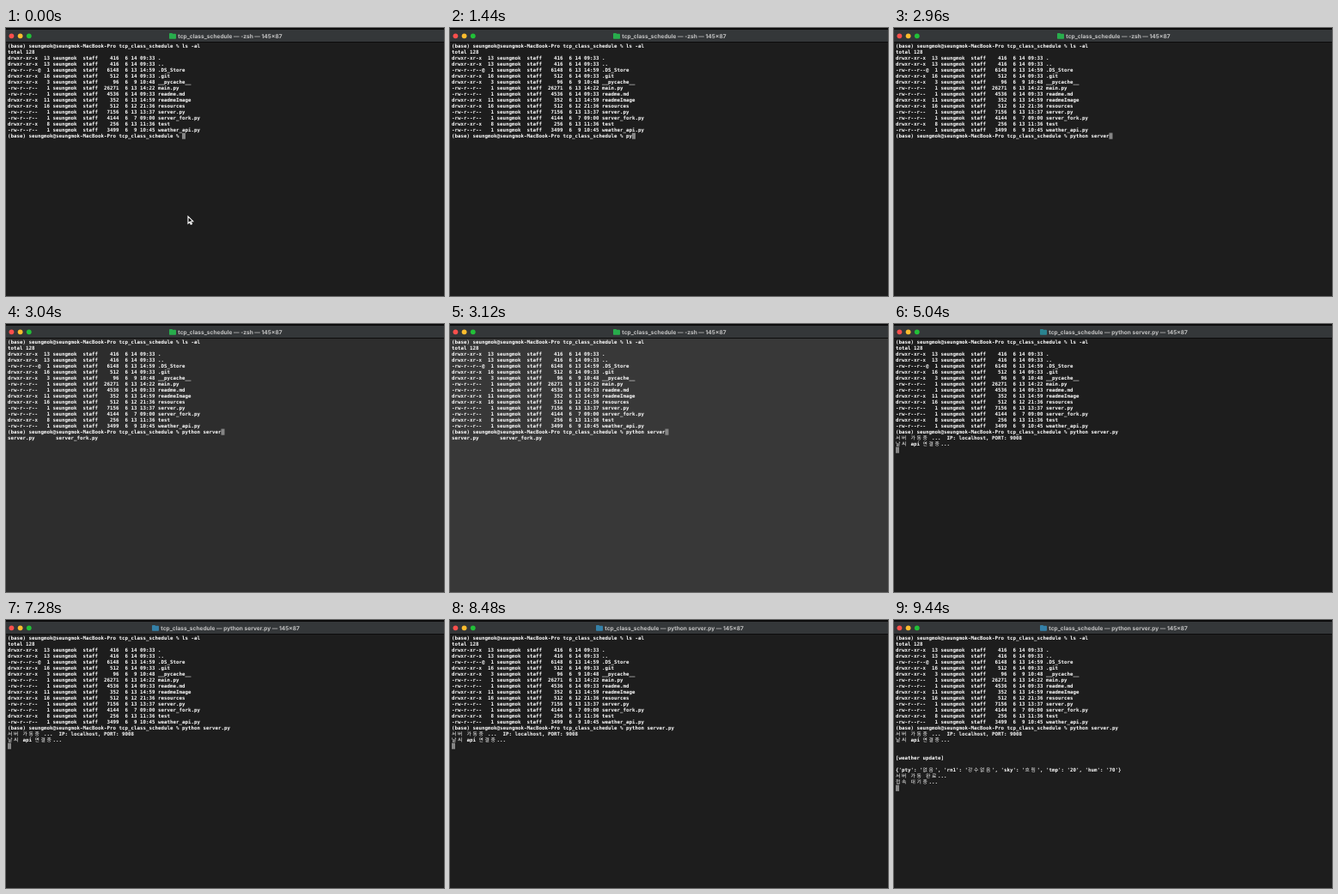
An HTML page with a canvas that plays this animation: 510x313 px, repeating every 9.52 s.

```html
<!DOCTYPE html>
<html lang="en">
<head>
<meta charset="utf-8">
<title>Terminal</title>
<style>
  html, body { margin: 0; width: 510px; height: 313px; overflow: hidden; background: #1d1d1d; }
  canvas { display: block; }
</style>
</head>
<body>
<canvas id="stage" width="510" height="313"></canvas>
<script>
const ctx = document.getElementById('stage').getContext('2d');
const LOOP = 9520, CELL = 3.5, ROW = 7.02, LEFT = 2, TOP = 17.2;
const MONO = 'bold 5.8px "DejaVu Sans Mono", monospace';
const CJK = '500 5.8px "Noto Sans CJK KR", "Noto Sans CJK", sans-serif';
const TITLE = '700 6.6px Inter, sans-serif';

const user = 'seungmok';
const prompt = `(base) ${user}@${user}-MacBook-Pro tcp_class_schedule % `;
const command = 'python server.py';

// mode, links, size, date, name
const files = `d 13 416 6 14 09:33 .
d 13 416 6 14 09:33 ..
@ 1 6148 6 13 14:59 .DS_Store
d 16 512 6 14 09:33 .git
d 3 96 6 9 10:48 __pycache__
- 1 26271 6 13 14:22 main.py
- 1 4536 6 14 09:33 readme.md
d 11 352 6 13 14:59 readmeImage
d 16 512 6 12 21:36 resources
- 1 7156 6 13 13:37 server.py
- 1 4144 6 7 09:00 server_fork.py
d 8 256 6 13 11:36 test
- 1 3499 6 9 10:45 weather_api.py`.split('\n').map(listing);

const started = ['서버 가동중 ...  IP: localhost, PORT: 9008', '날씨 api 연결중...'];
const report = ['', '', '[weather update]', '',
  "{'pty': '없음', 'rn1': '강수없음', 'sky': '흐림', 'tmp': '20', 'hum': '70'}",
  '서버 가동 완료...', '접속 대기중...'];

// One time per typed character of the command
const keys = [1360, 1440, 1520, 1680, 1760, 1840, 2000, 2080, 2160, 2320, 2400,
  2640, 2880, 3440, 3600, 3680];
const TAB = 3040, ENTER = 4080, START = 4320, REPORT = 8720;

function listing(line) {
  const [kind, links, size, month, day, time, name] = line.split(' ');
  const mode = kind === 'd' ? 'drwxr-xr-x ' : '-rw-r--r--' + (kind === '@' ? '@' : ' ');
  return `${mode} ${links.padStart(2)} ${user}  staff  ${size.padStart(5)} ` +
    `${month.padStart(2)} ${day.padStart(2)} ${time} ${name}`;
}

function write(text, row) {
  const y = TOP + row * ROW + 5.4;
  let x = LEFT;
  for (const ch of text) {
    const wide = ch >= '가' && ch <= '힣';
    ctx.font = wide ? CJK : MONO;
    if (ch !== ' ') ctx.fillText(ch, x, y);
    x += wide ? CELL * 2 : CELL;
  }
}

function disc(x, y, r, color) {
  ctx.fillStyle = color;
  ctx.beginPath();
  ctx.arc(x, y, r, 0, Math.PI * 2);
  ctx.fill();
}

function folder(x, color) {
  ctx.fillStyle = color;
  ctx.beginPath();
  ctx.roundRect(x, 6, 4, 3, 0.8);
  ctx.roundRect(x, 6.8, 8, 6, 0.8);
  ctx.fill();
}

function titleBar(t) {
  ctx.fillStyle = '#343739';
  ctx.fillRect(0, 0, 510, 16);
  ctx.fillStyle = '#0c0c0c';
  ctx.fillRect(0, 0, 510, 2);
  ctx.fillRect(0, 16, 510, 1);
  ['#fb4f4c', '#fdbc2e', '#22c038'].forEach((c, i) => disc(6.4 + i * 10.2, 9.3, 2.9, c));

  const running = t >= ENTER;
  const x = running ? 170 : 190;
  folder(x, !running ? '#28ad4c' : t < 6000 ? '#2a8390' : '#3480a8');
  ctx.font = TITLE;
  ctx.fillStyle = '#c4c4c4';
  ctx.fillText(`tcp_class_schedule — ${running ? command : '-zsh'} — 145×87`, x + 10.3, 11.9);
}

function pointer(x, y) {
  ctx.beginPath();
  [[0, 0], [0, 8.2], [1.9, 6.5], [3.2, 9.3], [4.5, 8.7], [3.2, 6], [5.8, 5.8]]
    .forEach(([dx, dy]) => ctx.lineTo(x + dx, y + dy));
  ctx.closePath();
  ctx.fillStyle = '#000';
  ctx.fill();
  ctx.strokeStyle = '#fff';
  ctx.lineWidth = 1.1;
  ctx.stroke();
}

function bell(t) {
  const d = t - TAB;
  if (d < 0 || d >= 240) return 0;
  return d < 80 ? 0.6 : d < 160 ? 1 : 0.5;
}

function draw(t) {
  const shade = Math.round(29 + 27 * bell(t));
  ctx.fillStyle = `rgb(${shade},${shade},${shade})`;
  ctx.fillRect(0, 0, 510, 313);
  titleBar(t);

  const typed = command.slice(0, keys.filter(k => t >= k).length);
  const lines = [prompt + 'ls -al', 'total 128', ...files, prompt + typed];
  let row = 15, col = prompt.length + typed.length;
  if (t >= ENTER) {
    if (t >= START) lines.push(...started);
    if (t >= REPORT) lines.push(...report);
    row = lines.length;
    col = 0;
  } else if (t >= TAB) {
    lines.push('server.py       server_fork.py');
  }

  ctx.fillStyle = '#858585';
  ctx.fillRect(LEFT + col * CELL, TOP + row * ROW, 4, 7.2);
  ctx.fillStyle = '#fff';
  lines.forEach(write);
  if (t < keys[0]) pointer(212, 220);
}

ctx.textRendering = 'geometricPrecision';
const begin = performance.now();
function tick() {
  draw((performance.now() - begin) % LOOP);
  requestAnimationFrame(tick);
}
tick();
</script>
</body>
</html>
```
